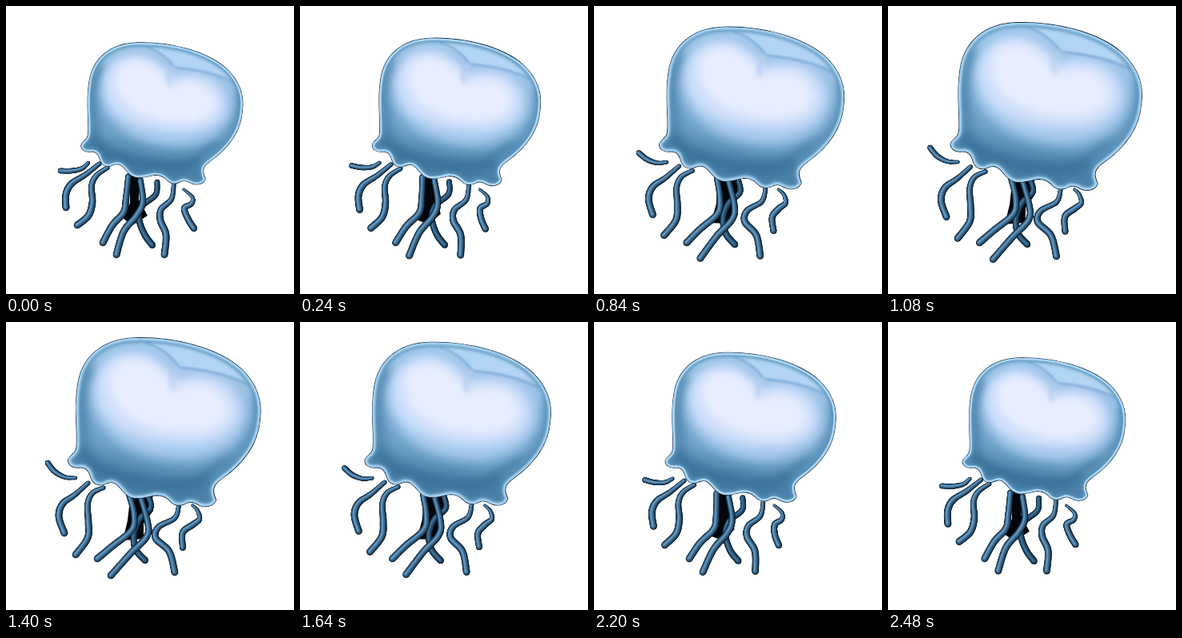
An HTML page with a canvas that plays this animation: 360 px wide and 360 px high, repeating every 2.52 s.

```html
<!DOCTYPE html>
<html>
<head>
<meta charset="utf-8">
<style>
html, body { margin: 0; height: 100%; overflow: hidden; background: #fff; }
canvas { display: block; width: 360px; height: 360px; }
</style>
</head>
<body>
<canvas id="stage" width="360" height="360"></canvas>
<script>
const ctx = document.getElementById('stage').getContext('2d');
const LOOP = 2520, STEP = 40;

const bell = new Path2D(`M94 174C97 167 103 168 103 158C104 138 100 122 104 96
  C108 66 130 47 164 46C205 45 250 56 275 78C292 94 298 112 295 132C293 158 277 178 256 193
  C246 200 244 205 249 216C247 222 240 224 233 222C227 219 223 217 219 219C212 223 205 222 201 217
  C196 212 192 211 186 211C178 212 173 215 163 214C153 212 151 204 144 199C139 196 135 198 130 200
  C122 201 119 197 117 190C115 183 110 181 104 182C98 182 94 179 94 174Z`);

// Each tentacle: root-to-tip points at rest and when the bell is wide, then root and tip radius.
const tentacles = [];
const tentacle = (rest, wide, r0 = 2.4, r1 = 4, shade = 0) => tentacles.push({ rest, wide, r0, r1, shade });
tentacle([189,220, 187,236, 170,250, 166,265, 173,285, 183,299], [178,218, 181,232, 168,245, 160,265, 162,284, 174,298], 3, 3.6, 1);
tentacle([103,196, 95,203, 82,206, 68,206], [87,195, 74,194, 61,187, 52,176], 2, 3);
tentacle([117,197, 99,211, 82,222, 75,235, 75,252], [103,201, 86,216, 71,227, 66,243, 73,264]);
tentacle([127,202, 113,212, 107,225, 108,245, 103,262, 89,274], [122,207, 108,214, 102,228, 103,250, 102,270, 87,291]);
tentacle([153,213, 150,240, 147,258, 133,274, 121,296], [154,216, 160,240, 157,260, 132,281, 114,296], 3.4);
tentacle([168,218, 171,245, 163,262, 147,282, 138,311], [168,218, 177,250, 176,268, 156,289, 131,317], 3.4);
tentacle([210,220, 207,241, 194,254, 193,268, 200,286, 198,311], [216,230, 211,245, 191,256, 187,270, 204,287, 211,313]);
tentacle([222,229, 233,239, 232,247, 223,253, 228,267, 235,278], [233,229, 239,235, 242,246, 234,253, 221,263, 221,282], 1.4, 3.6);

const mix = (a, b, u) => a.map((v, i) => v + (b[i] - v) * u);

// Catmull-Rom samples as [x, y, progress].
function samples(p) {
  const n = p.length / 2 - 1, out = [];
  const at = (i, k) => p[2 * Math.max(0, Math.min(n, i)) + k];
  for (let s = 0; s <= n * 24; s++) {
    const i = Math.min(n - 1, Math.floor(s / 24)), t = s / 24 - i;
    const value = k => {
      const [a, b, c, d] = [at(i - 1, k), at(i, k), at(i + 1, k), at(i + 2, k)];
      return b + t * (c - a + t * (2 * a - 5 * b + 4 * c - d + t * (3 * (b - c) + d - a))) / 2;
    };
    out.push([value(0), value(1), s / (n * 24)]);
  }
  return out;
}

function drawTentacle({ rest, wide, r0, r1, shade }, u) {
  const pts = samples(mix(rest, wide, u));
  const layer = (scale, dx, dy, color) => {
    ctx.fillStyle = color;
    for (const [x, y, q] of pts) {
      const r = (r0 + (r1 - r0) * Math.min(1, q * 1.6)) * scale;
      ctx.beginPath();
      ctx.arc(x + dx, y + dy, r, 0, 7);
      ctx.fill();
    }
  };
  layer(1.08, 0, 0, '#0b1c2a');
  layer(0.84, -0.3, -0.1, shade ? '#1d4260' : '#28506f');
  layer(0.52, -0.7, -0.3, shade ? '#2f5c7d' : '#44739a');
  layer(0.22, -1.1, -0.5, shade ? '#45759a' : '#6c9cc0');
}

function drawHollow(u) {
  const p = mix([154,210, 168,210, 166,242, 177,262, 158,274, 147,266, 155,246],
                [156,212, 183,212, 184,236, 172,252, 172,271, 146,273, 152,248], u);
  ctx.fillStyle = '#02060a';
  ctx.beginPath();
  for (let i = 0; i < p.length; i += 2) ctx.lineTo(p[i], p[i + 1]);
  ctx.fill();
}

function drawBell(size) {
  const blur = b => ctx.filter = b ? `blur(${b * size}px)` : 'none';
  const fill = (d, color, b) => { blur(b); ctx.fillStyle = color; ctx.fill(new Path2D(d)); };
  const line = (d, color, w, b) => {
    blur(b);
    ctx.strokeStyle = color;
    ctx.lineWidth = w;
    ctx.stroke(d instanceof Path2D ? d : new Path2D(d));
  };
  ctx.save();
  ctx.translate(179, 183);
  ctx.scale(size, size);
  ctx.translate(-179, -183);
  ctx.lineJoin = ctx.lineCap = 'round';
  line(bell, '#122a3c', 1.5, 0);
  ctx.clip(bell);

  const base = ctx.createLinearGradient(215, 45, 180, 222);
  [[0, '#a5cdee'], [0.4, '#86b4da'], [0.7, '#6da0c6'], [0.86, '#4c83aa'], [1, '#477da3']]
    .forEach(([at, color]) => base.addColorStop(at, color));
  blur(0);
  ctx.fillStyle = base;
  ctx.fill(bell);

  line('M112 170C107 130 104 105 118 80', '#5388af', 13, 5);
  line('M108 168C124 188 165 200 205 201C230 201 245 192 262 178', '#3b7198', 14, 6);
  line('M292 112C294 150 270 175 248 192', '#5c93ba', 12, 5);
  fill(`M118 105C118 72 140 54 170 56C190 58 202 70 209 80C235 74 275 84 282 115
    C287 150 255 172 218 174C172 175 121 155 118 105Z`, '#a9cbed', 6);
  fill(`M124 96C126 70 148 58 171 63C189 67 200 82 208 90C240 80 270 92 273 120
    C274 146 248 158 216 157C170 156 121 140 124 96Z`, '#cfe0fa', 5);
  fill(`M137 88C139 72 158 65 175 71C190 77 199 90 206 101C230 88 258 98 261 120
    C262 140 236 147 212 145C172 142 135 124 137 88Z`, '#e7edff', 5);
  fill('M178 51C220 51 260 66 284 92C262 83 235 78 212 76C202 66 192 57 178 51Z', '#b2d5f3', 1.5);
  line('M176 51C192 56 203 66 211 77C234 79 262 84 282 95', '#82afd8', 2.2, 1);
  line('M210 77C203 84 202 91 204 98', '#b5cff0', 4, 2.5);
  line(bell, '#5b93bb', 9, 2);
  line(bell, '#acd5f2', 5, 0.7);
  ctx.restore();
}

function frame(now) {
  const t = Math.floor(now % LOOP / STEP) * STEP;
  const swell = 1 - Math.abs(1 - 2 * t / LOOP);
  const u = swell * 1.125;
  ctx.fillStyle = '#fff';
  ctx.fillRect(0, 0, 360, 360);
  drawHollow(u);
  tentacles.forEach(item => drawTentacle(item, u));
  drawBell(1 + 0.213 * swell);
  requestAnimationFrame(frame);
}
const start = performance.now();
requestAnimationFrame(now => frame(Math.max(0, now - start)));
</script>
</body>
</html>
```
